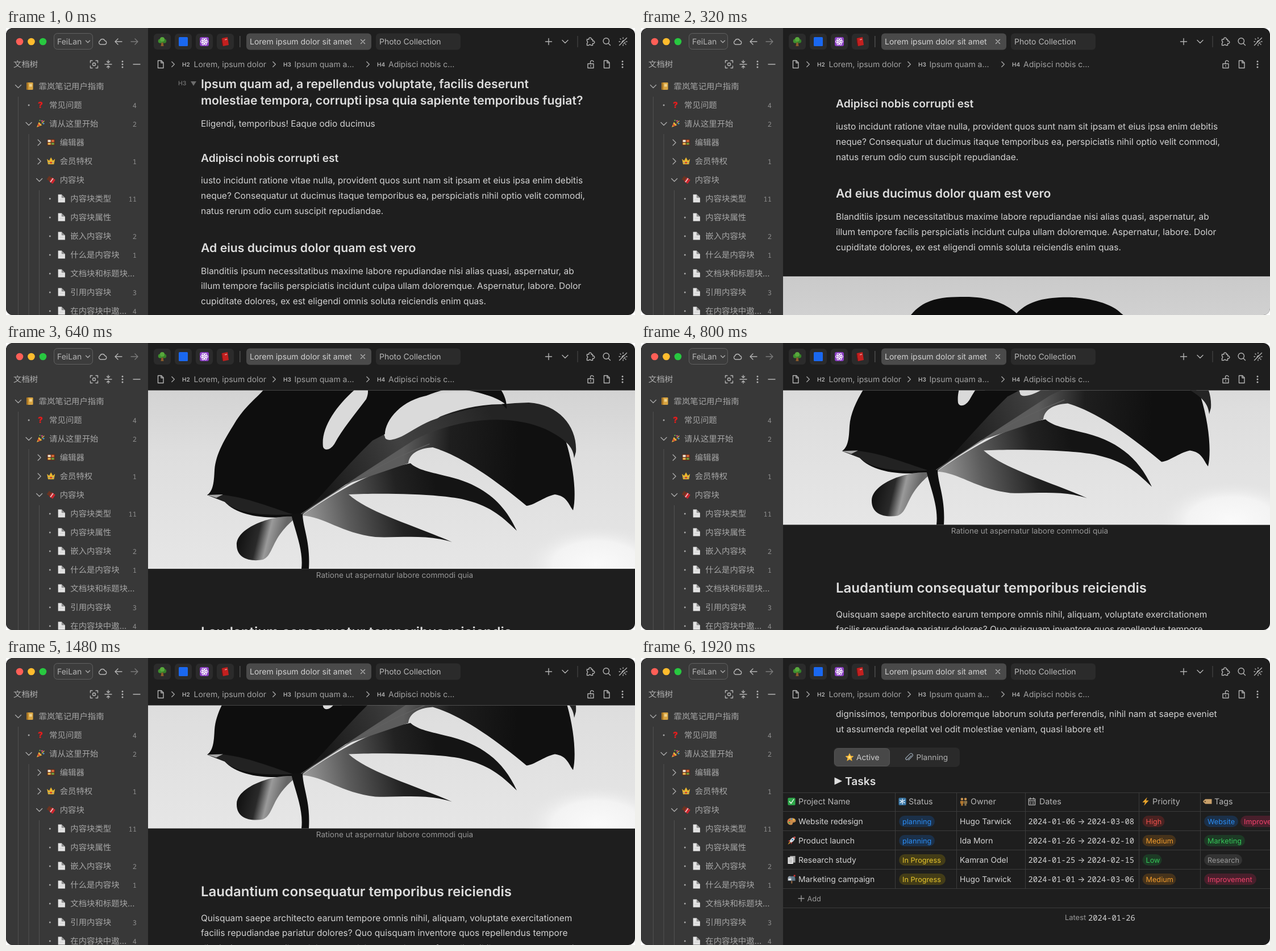
An HTML page that plays this animation: 1107x506 px, repeating every 2920 ms.

```html
<!DOCTYPE html>
<html lang="zh-CN">
<head>
<meta charset="utf-8">
<title>Notes</title>
<style>
html, body { margin: 0; width: 100%; height: 100%; overflow: hidden; background: #fff; }
svg { display: block; width: 1107px; height: 506px; }
text { font-family: Inter, "Noto Sans CJK SC", "Noto Sans CJK", sans-serif; text-rendering: geometricPrecision; white-space: pre; }
.mono { font-family: "Noto Sans Mono", monospace; }
.line { fill: none; stroke-width: 1.4; stroke-linecap: round; stroke-linejoin: round; }
</style>
</head>
<body>
<svg viewBox="0 0 1107 506">
  <defs>
    <clipPath id="window"><rect width="1107" height="506" rx="12"/></clipPath>
    <clipPath id="view"><rect x="250" y="83.5" width="857" height="423"/></clipPath>
    <linearGradient id="sky" x2="0" y2="1"><stop stop-color="#cacaca"/><stop offset=".5" stop-color="#dedede"/><stop offset="1" stop-color="#e6e6e6"/></linearGradient>
    <radialGradient id="cloud"><stop stop-color="#fafafa"/><stop offset=".6" stop-color="#f3f3f3"/><stop offset="1" stop-color="#e6e6e6" stop-opacity="0"/></radialGradient>
    <linearGradient id="shine" gradientUnits="userSpaceOnUse" x1="530" y1="310" x2="760" y2="270"><stop stop-color="#969696"/><stop offset=".3" stop-color="#5c5c5c"/><stop offset=".7" stop-color="#222"/><stop offset="1" stop-color="#141414"/></linearGradient>
    <linearGradient id="upper" gradientUnits="userSpaceOnUse" x1="560" y1="270" x2="860" y2="140"><stop stop-color="#181818"/><stop offset=".5" stop-color="#424242"/><stop offset="1" stop-color="#242424"/></linearGradient>
    <linearGradient id="blade" gradientUnits="userSpaceOnUse" x1="700" y1="190" x2="900" y2="200"><stop stop-color="#5c5c5c"/><stop offset=".4" stop-color="#1e1e1e"/><stop offset="1" stop-color="#101010"/></linearGradient>
    <linearGradient id="curl" gradientUnits="userSpaceOnUse" x1="415" y1="335" x2="485" y2="352"><stop stop-color="#141414"/><stop offset=".4" stop-color="#2a2a2a"/><stop offset=".65" stop-color="#9a9a9a"/><stop offset="1" stop-color="#666"/></linearGradient>
  </defs>
  <g clip-path="url(#window)">
    <rect width="1107" height="506" fill="#1e1e1e"/>
    <rect width="250" height="506" fill="#383838"/>
    <g id="chrome"></g>
    <g clip-path="url(#view)"><g id="page"></g></g>
  </g>
</svg>
<script>
const rect = (x, y, w, h, fill, r = 0, extra = '') =>
  `<rect x="${x}" y="${y}" width="${w}" height="${h}" rx="${r}" fill="${fill}" ${extra}/>`;
const text = (x, y, string, size, fill, extra = '') =>
  `<text x="${x}" y="${y}" font-size="${size}" fill="${fill}" ${extra}>${string}</text>`;
const line = (x, y, d, color = '#b4b4b4') =>
  `<path class="line" transform="translate(${x} ${y})" stroke="${color}" d="${d}"/>`;
const fill = (color, d) => `<path fill="${color}" d="${d}"/>`;
const dot = (x, y, r, color) => `<circle cx="${x}" cy="${y}" r="${r}" fill="${color}"/>`;
const bold = 'font-weight="600"';

// Line icons, centred on the origin
const down = 'M-5-2.5 0 2.5 5-2.5', right = 'M-2.5-5 2.5 0-2.5 5', plus = 'M-5.5 0H5.5M0-5.5V5.5';
const crumb = 'M-2.2-4.5 2.3 0-2.2 4.5', page = 'M-4.5-6.5H1.5L5-3V6.5H-4.5ZM1-6.5V-2.5H5';
const left = 'M6 0H-6M-1-5-6 0-1 5', forward = 'M-6 0H6M1-5 6 0 1 5';

// Small pictures in a 16 by 16 box around the origin
const pictures = {
  tree: fill('#8a5a2b', 'M-1.5 1H1.5L2.5 8H-2.5Z') + dot(-3.5, -1, 3.8, '#3f8f2e') + dot(3.5, -1, 3.8, '#357f28') + dot(0, -4, 4, '#58a83c'),
  square: rect(-8, -8, 16, 16, '#1a68f0', 1.5),
  atom: rect(-8, -8, 16, 16, '#8b3fc4', 3) + [0, 60, 120].map(a =>
    `<ellipse rx="6.3" ry="2.5" fill="none" stroke="#fff" stroke-width="1.1" transform="rotate(${a})"/>`).join('') + dot(0, 0, 1.3, '#fff'),
  book: fill('#c3201f', 'M-6-6 4-8 6 6-4 8Z') + fill('#7d0f12', 'M-6-6-4 8-5.5 6.5-7-5Z') + fill('#e8a0a0', 'M-1-4 3-4.8 3.2-3.4-.8-2.6Z'),
  notebook: rect(-6, -7, 12, 14, '#d9a441', 1.5) + rect(-6, -7, 3, 14, '#a87422', 1) + rect(-1, -4, 5, 5, '#f0d28c'),
  question: `<text y="6" font-size="16" fill="#e01d1d" text-anchor="middle" font-weight="900">?</text>`,
  party: fill('#e8b13a', 'M-7 7-3-3 3 3Z') + fill('#d0482f', 'M-5.5 3-4.2 0 0 4.2-3 5.4Z') + dot(3, -5, 1.5, '#e8508c') + dot(6, 0, 1.4, '#4fa3e0') + dot(-1, -6, 1.2, '#6cc04a') + fill('#e8c24a', 'M2-1 7-6 7.5-4.5 3 0Z'),
  box: rect(-7.5, -6, 15, 12, '#5a2a1c', 1) + rect(-6, -4.5, 5.5, 4, '#f2e8d4') + rect(.8, -4.5, 5.2, 4, '#d86a36') + rect(-6, .8, 5.5, 3.8, '#e8b34c') + rect(.8, .8, 5.2, 3.8, '#6f9c3d'),
  crown: fill('#e9b52e', 'M-7.5-4-3.5-.5 0-7 3.5-.5 7.5-4 5.5 6H-5.5Z') + dot(0, 3, 1.6, '#c22') + dot(-3.5, 3, 1, '#4b8ad0') + dot(3.5, 3, 1, '#4b8ad0'),
  chocolate: `<g transform="rotate(35)">${rect(-7, -4, 8, 8, '#6b3321')}${rect(-1, -4.5, 8, 9, '#c9252d', 1)}${rect(1, -4.5, 1.5, 9, '#e8e0dc')}</g>`,
  file: fill('#e4e4e4', 'M-6.5-7.5H0L6.5-1V7.5H-6.5Z') + fill('#8d8d8d', 'M0-7.5V-1H6.5Z') + fill('#c4c4c4', 'M-4 2H4V3H-4Z'),
  star: fill('#f6b93b', 'M0-8 2.4-2.8 8-2.2 3.8 1.6 5 7.2 0 4.3-5 7.2-3.8 1.6-8-2.2-2.4-2.8Z') + dot(0, 0, 2.5, '#ffe082'),
  clip: line(0, 0, 'M4-3-3 4A2 2 0 0 1-6 1L1-6A3 3 0 0 1 6-2L-1 5', '#8d99a5'),
  check: rect(-7, -7, 14, 14, '#2fa84a', 2) + line(0, 0, 'M-4 0-1 3.5 4-4', '#fff'),
  flake: rect(-7, -7, 14, 14, '#3a78a8', 2) + line(0, 0, 'M0-5V5M-4.4-2.5 4.4 2.5M-4.4 2.5 4.4-2.5', '#e6f1fa'),
  pair: dot(-3.3, -4.5, 2.4, '#c99350') + dot(3.3, -4.5, 2.4, '#c99350') + fill('#b0762e', 'M-6.5-1H-.4V4H-1.5V8H-5V4H-6.5Z') + fill('#8a7248', 'M.4-1H6.5V4H5V8H1.5V4H.4Z'),
  calendar: line(0, 0, 'M-6-5H6V6.5H-6ZM-6-1.5H6M-3-7V-4M3-7V-4M-3 1.5H-2M1.5 1.5H3M-3 4H-2M1.5 4H3', '#b0b0b0'),
  bolt: fill('#e8a32b', 'M3-8-6 1.5H-1L-3 8 6-2H1Z'),
  label: fill('#c9a06a', 'M-8-1-4-4.5H8V4.5H-4L-8 1Z') + dot(-4.5, 0, 1.2, '#4a3a26'),
  palette: fill('#c98a4b', 'M-8 0C-7-9 8-8 8-1 8 3 2 1 2 4 2 9-9 7-8 0Z') + dot(-4, -2, 1.5, '#d43') + dot(0, -4.5, 1.5, '#48c') + dot(4, -3, 1.5, '#ec4') + dot(-4, 2.5, 1.5, '#4a5'),
  rocket: fill('#d8dde2', 'M7-7.5C2-7-2-3-4 1L-1 4C3 2 7-2 7-7.5Z') + fill('#cf3a35', 'M-2-2-7 1-4 1.5ZM2 2-1 7-1.5 4ZM7-7.5 2.5-6.2 6-2.8Z') + fill('#f2a032', 'M-4 2-7 7.5-2 4Z') + dot(1.7, -2, 1.5, '#3d7fb8'),
  pages: fill('#a9a9a9', 'M-3-7.5H7V5H-3Z') + fill('#e6e6e6', 'M-7-5H3V7.5H-7Z') + fill('#8a8a8a', 'M-5-2.5H1V-1.5H-5ZM-5 .5H1V1.5H-5ZM-5 3.5H1V4.5H-5Z'),
  mailbox: fill('#8e9aa4', 'M-7 3V-2C-7-7 0-7 0-2V3Z') + fill('#5f7686', 'M-3-5.5H4C7-5.5 7 0 7 3H0V-2Z') + rect(-1, 3, 2.5, 5, '#876040') + fill('#d33', 'M4-8H7V-5H4Z') + rect(-6, -1, 5, 3, '#eee'),
};
const icon = (name, x, y, size = 15) => `<g transform="translate(${x} ${y}) scale(${size / 16})">${pictures[name]}</g>`;

function drawSidebar() {
  const ink = '#a6a6a6';
  let s = dot(24, 24, 6.3, '#ff5f57') + dot(44.5, 24, 6.3, '#febc2e') + dot(65, 24, 6.3, '#28c840')
    + rect(84.5, 9.5, 68, 28, '#3c3c3c', 6, 'stroke="#606060"') + text(90, 29, 'FeiLan', 14, '#b4b4b4')
    + line(144, 24, 'M-3.5-1.8 0 1.8 3.5-1.8', ink)
    + line(170, 24, 'M-4 5A3.5 3.5 0 0 1-4.5-1.5 4.5 4.5 0 0 1 4-1.5 3.3 3.3 0 0 1 4 5Z')
    + line(198, 24, left) + line(226, 24, forward, '#7a7a7a')
    + text(13, 69, '文档树', 14.4, '#b0b0b0')
    + line(155, 64, 'M-6.5-3V-6.5H-3M3-6.5H6.5V-3M6.5 3V6.5H3M-3 6.5H-6.5V3M2.5 0A2.5 2.5 0 1 1-2.5 0 2.5 2.5 0 0 1 2.5 0Z')
    + line(180, 64, 'M-6 0H6M0-7V-3M-2.5-5 0-2.8 2.5-5M0 7V3M-2.5 5 0 2.8 2.5 5')
    + [-5, 0, 5].map(d => dot(205, 64 + d, 1.5, '#b4b4b4')).join('')
    + line(230, 64, 'M-6 0H6')
    + rect(21, 121, 1, 385, '#515151') + rect(39.5, 187, 1, 319, '#515151') + rect(58, 286, 1, 220, '#515151');
  // depth, marker, picture, title, count
  const rows = [
    [0, down, 'notebook', '霏岚笔记用户指南', ''], [1, '', 'question', '常见问题', 4], [1, down, 'party', '请从这里开始', 2],
    [2, right, 'box', '编辑器', ''], [2, right, 'crown', '会员特权', 1], [2, down, 'chocolate', '内容块', ''],
    ...[['内容块类型', 11], ['内容块属性', ''], ['嵌入内容块', 2], ['什么是内容块', 1], ['文档块和标题块…', ''], ['引用内容块', 3], ['在内容块中遨…', 4]]
      .map(([title, count]) => [3, '', 'file', title, count]),
  ];
  rows.forEach(([depth, marker, picture, title, count], i) => {
    const x = 21.5 + depth * 18.6, y = 103 + i * 33;
    s += (marker ? line(x, y, marker, ink) : dot(x, y, 1.5, ink)) + icon(picture, x + 20.5, y - .5)
      + text(x + 36, y + 5.2, title, 14.4, ink) + text(230, y + 4.5, count, 12, '#909090', 'class="mono" text-anchor="end"');
  });
  return s;
}

function drawToolbar() {
  const ink = '#a2a2a2', level = (x, n) => text(x, 68, 'H' + n, 10, '#b4b4b4', bold);
  return ['tree', 'square', 'atom', 'book'].map((name, i) =>
      rect(260 + i * 37, 10, 30, 28, '#2b2b2b', 6) + icon(name, 275 + i * 37, 24, 16)).join('')
    + rect(411, 14, 1.5, 20, '#4c4c4c')
    + rect(423, 9.5, 220, 29, '#4a4a4a', 6) + text(429, 29, 'Lorem ipsum dolor sit amet', 14, '#d2d2d2') + line(628, 24, 'M-3.5-3.5 3.5 3.5M-3.5 3.5 3.5-3.5')
    + rect(651, 9.5, 149, 29, '#2b2b2b', 6) + text(657, 29, 'Photo Collection', 14, '#b8b8b8')
    + line(955, 24, plus) + line(984, 24, down) + rect(1005.5, 14, 1, 20, '#4c4c4c')
    + line(1028, 24, 'M-5.5-4H-2A2.2 2.2 0 1 1 2-4H4.5V-.8A2.2 2.2 0 1 1 4.5 3V6.5H1.5A2 2 0 0 0-2.2 6.5H-5.5V3A2.2 2.2 0 0 0-5.5-1Z')
    + line(1057, 24, 'M4.5-1A5.2 5.2 0 1 1-5.9-1 5.2 5.2 0 0 1 4.5-1ZM3 3 6.5 6.5')
    + line(1086, 24, 'M-6.5 6.5 6.5-6.5M-2 2A4 4 0 0 1 2-2M1 3.5A4 4 0 0 0 3.5 1M0-7V-5.5M-5-5-4-4M-7 0H-5.5M5 5 4 4M7 0H5.5M0 7V5.5')
    + line(272, 64, page) + line(294, 64, crumb, ink)
    + level(310, 2) + text(330.5, 69, 'Lorem, ipsum dolor', 14, ink) + line(472, 64, crumb, ink)
    + level(488, 3) + text(507.5, 69, 'Ipsum quam a…', 14, ink) + line(637, 64, crumb, ink)
    + level(653, 4) + text(673, 69, 'Adipisci nobis c…', 14, ink)
    + line(1029, 64, 'M-5-1H5V6.5H-5ZM-.5-1V-4A2.8 2.8 0 0 1 5-4.5M0 2V3.5') + line(1057, 64, page)
    + [-5, 0, 5].map(d => dot(1085, 64 + d, 1.5, '#b4b4b4')).join('');
}

function drawPhoto() {
  return `<g transform="translate(0 543)">` + rect(250, -10, 857, 408, 'url(#sky)')
    + `<svg x="250" y="-10" width="857" height="408"><ellipse cx="790" cy="400" rx="130" ry="68" fill="url(#cloud)"/></svg>`
    + fill('url(#shine)', 'M520 304C570 270 640 225 712 212C724 224 750 228 772 234C836 248 875 278 899 331C870 303 850 286 802 275C760 266 660 264 603 267C640 300 720 322 785 351C740 336 690 344 650 342C590 335 560 306 520 304Z')
    + fill('url(#blade)', 'M590 252 690 180 800 105C900 100 960 130 985 172C1000 220 1004 270 998 295C990 285 988 270 966 267C945 272 930 286 916 287C860 240 800 198 751 184C725 186 710 195 708 212Z')
    + fill('url(#upper)', 'M520 303C560 220 600 165 645 110L668 168C720 150 790 108 920 105C975 108 1006 150 1003 192L1000 203C998 182 985 170 950 152C890 125 800 130 720 170C650 215 580 260 520 303Z')
    + fill('#0e0e0e', 'M515 304C470 312 410 308 385 280L354 268C366 260 366 240 367 224C369 195 386 168 402 142C420 112 440 98 452 84L475 58C500 27 535 26 570 26C610 26 640 36 661 55C685 30 720 26 760 27C800 30 830 40 845 55C870 75 882 95 881 116C860 92 830 84 785 80C730 88 690 118 668 160L645 172C600 215 560 265 520 304Z')
    + fill('#dadada', 'M558 183C554 150 580 112 614 82C634 68 642 80 634 99C612 128 592 152 578 178C570 190 560 190 558 183Z')
    + fill('#dadada', 'M667 166C664 138 695 100 745 92C790 83 845 82 878 107L870 108C800 109 745 135 705 160C685 172 668 174 667 166Z')
    + fill('#222', 'M354 268C400 262 460 288 505 302C440 306 400 296 385 280Z')
    + fill('#a8a8a8', 'M354 268 382 267 370 273Z')
    + fill('url(#curl)', 'M508 306C470 302 405 325 406 356C406 380 430 386 452 382C472 374 465 345 508 310Z')
    + fill('#101010', 'M502 302 522 300C522 325 536 350 533 398H520C524 365 508 330 502 302Z')
    + line(0, 0, 'M520 301C590 255 650 215 745 178', '#606060') + '</g>';
}

function drawTable() {
  const rule = '#3b3b3b', mono = 'class="mono"', arrow = '<tspan font-family="Inter, sans-serif"> → </tspan>';
  const tones = { blue: ['#2b8cf2', '#1b3049'], yellow: ['#e8c62c', '#433c17'], red: ['#f0524c', '#482221'], orange: ['#ee9a2c', '#46331b'],
    green: ['#35c759', '#1d3a25'], grey: ['#9a9a9a', '#333'], pink: ['#f0426c', '#481f2b'] };
  const pill = (x, y, label, width, [ink, back]) => rect(x, y - 10, width, 20, back, 10) + text(x + 6, y + 4.6, label, 12.7, ink);
  let s = [237, 270, 304, 338, 372, 406, 440].map(y => rect(250, y, 857, 1, rule)).join('')
    + [447, 555, 676, 876, 984].map(x => rect(x, 237, 1, 170, rule)).join('');
  [['check', 265, 'Project Name', 277], ['flake', 460, 'Status', 471], ['pair', 568, 'Owner', 580], ['calendar', 688, 'Dates', 701],
    ['bolt', 888, 'Priority', 900], ['label', 997, 'Tags', 1009]].forEach(([name, x, title, tx]) => {
    s += icon(name, x, 253) + text(tx, 258.2, title, 14.3, '#b6b6b6');
  });
  const planning = ['planning', 63, tones.blue], progress = ['In Progress', 82, tones.yellow], medium = ['Medium', 59, tones.orange];
  const improvement = ['Improvement', 92, tones.pink];
  [['palette', 'Website redesign', planning, 'Hugo Tarwick', '01-06', '03-08', ['High', 39, tones.red], ['Website', 60, tones.blue]],
    ['rocket', 'Product launch', planning, 'Ida Morn', '01-26', '02-10', medium, ['Marketing', 72, tones.green]],
    ['pages', 'Research study', progress, 'Kamran Odel', '01-25', '02-15', ['Low', 34, tones.green], ['Research', 67, tones.grey]],
    ['mailbox', 'Marketing campaign', progress, 'Hugo Tarwick', '01-01', '03-06', medium, improvement],
  ].forEach(([name, title, status, owner, from, to, priority, tag], i) => {
    const y = 288 + i * 34;
    s += icon(name, 265, y) + text(277, y + 5, title, 13.9, '#d4d4d4') + pill(454, y, ...status) + text(561, y + 5, owner, 13.9, '#d4d4d4')
      + text(681.5, y + 5, `2024-${from}${arrow}2024-${to}`, 13.8, '#d4d4d4', mono) + pill(882.5, y, ...priority) + pill(991, y, ...tag);
  });
  return s + pill(1055, 288, ...improvement)
    + line(282, 424, 'M-5 0H5M0-5V5', '#999') + text(292.5, 428.5, 'Add', 12.7, '#999')
    + text(746, 462.3, 'Latest', 12.9, '#999') + text(787, 463, '2024-01-26', 13.8, '#d4d4d4', mono);
}

function drawPage() {
  const heading = (y, string, size) => text(343, y, string, size, '#dedede', bold);
  const body = (y, ...lines) => lines.map((string, i) => text(343, y + i * 26.8, string, 15.5, '#d2d2d2')).join('');
  return text(303, 101, 'H3', 10.5, '#6c6c6c', bold) + fill('#6c6c6c', 'M325 94H335L330 102Z')
    + heading(105.5, 'Ipsum quam ad, a repellendus voluptate, facilis deserunt', 21.2)
    + heading(134.5, 'molestiae tempora, corrupti ipsa quia sapiente temporibus fugiat?', 21.2)
    + body(173.5, 'Eligendi, temporibus! Eaque odio ducimus')
    + heading(235.5, 'Adipisci nobis corrupti est', 19.2)
    + body(274.4, 'iusto incidunt ratione vitae nulla, provident quos sunt nam sit ipsam et eius ipsa enim debitis',
      'neque? Consequatur ut ducimus itaque temporibus ea, perspiciatis nihil optio velit commodi,', 'natus rerum odio cum suscipit repudiandae.')
    + heading(394.5, 'Ad eius ducimus dolor quam est vero', 21.2)
    + body(433.6, 'Blanditiis ipsum necessitatibus maxime labore repudiandae nisi alias quasi, aspernatur, ab',
      'illum tempore facilis perspiciatis incidunt culpa ullam doloremque. Aspernatur, labore. Dolor', 'cupiditate dolores, ex est eligendi omnis soluta reiciendis enim quas.')
    + drawPhoto()
    + text(684, 957, 'Ratione ut aspernatur labore commodi quia', 13.6, '#979797', 'text-anchor="middle"')
    + heading(1060.4, 'Laudantium consequatur temporibus reiciendis', 24)
    + body(1104.2, 'Quisquam saepe architecto earum tempore omnis nihil, aliquam, voluptate exercitationem',
      'facilis repudiandae pariatur dolores? Quo quisquam inventore quos repellendus tempore',
      'dignissimos, temporibus doloremque laborum soluta perferendis, nihil nam at saepe eveniet', 'ut assumenda repellat vel odit molestiae veniam, quasi labore et!')
    + '<g transform="translate(0 1054)">'
    + rect(339, 158, 222, 34, '#2a2a2a', 7) + rect(340.5, 159.5, 97, 31, '#484848', 6, 'stroke="#555"')
    + icon('star', 367, 175) + text(379, 180, 'Active', 13.7, '#cfcfcf') + icon('clip', 472, 175) + text(484.5, 180, 'Planning', 13.7, '#b0b0b0')
    + fill('#dedede', 'M340.5 210.5 354 217 340.5 223.5Z') + text(359, 223.7, 'Tasks', 19.2, '#dedede', bold)
    + drawTable() + '</g>';
}

const content = document.getElementById('page');
content.innerHTML = drawPage();
document.getElementById('chrome').innerHTML = drawSidebar() + drawToolbar();

// cubic-bezier(.65, 0, .35, 1), solved by bisection
function ease(x) {
  x = Math.min(1, Math.max(0, x));
  let low = 0, high = 1, p = 0;
  for (let i = 0; i < 24; i++) {
    p = (low + high) / 2;
    const bx = 1.95 * p * (1 - p) ** 2 + 1.05 * p * p * (1 - p) + p ** 3;
    if (bx < x) low = p; else high = p;
  }
  return p * p * (3 - 2 * p);
}

const LOOP = 2920, STEP = 40, start = performance.now();
function frame() {
  const t = Math.floor((performance.now() - start) % LOOP / STEP) * STEP;
  const scroll = 638 * ease(t / 960) + 416 * ease((t - 1440) / 480);
  content.setAttribute('transform', `translate(0 ${-scroll.toFixed(2)})`);
  requestAnimationFrame(frame);
}
frame();
</script>
</body>
</html>
```
